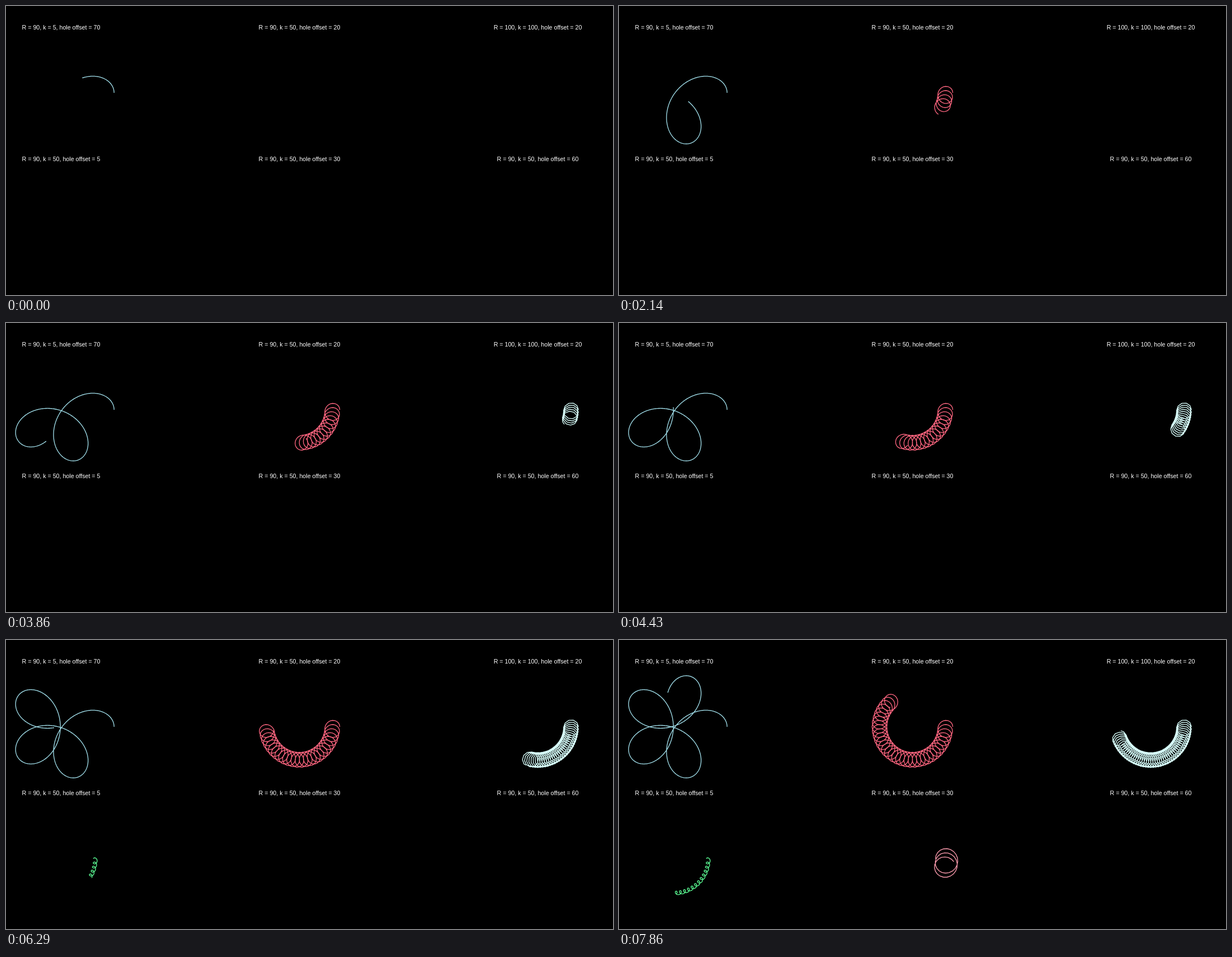
Animation of 1085x516 px, one loop 8 s. Source, as an HTML page:

```html
<!DOCTYPE html>
<html lang="en">
<head>
<meta charset="utf-8">
<title>Spirographs</title>
<style>
  html, body { margin: 0; width: 100%; height: 100%; overflow: hidden; background: #000; }
  svg { display: block; width: 100%; height: 100%; }
  path { fill: none; stroke-width: 2; }
  text { fill: #fff; font: 16px "Liberation Sans", Arial, sans-serif; text-anchor: middle; }
</style>
</head>
<body>
<svg viewBox="0 0 1085 516"></svg>
<script>
const LOOP = 8000, FRAME = 1000 / 7;
const DRAW_TIME = 10000, STAGGER = 2000, HEAD_START = 610;
const SCALE = 2 / 3, SEGMENTS = 1000, R = 90;

// side -1: the wheel rolls inside the ring, +1: outside
const curves = [
  { labelR: 90, k: 5, hole: 70, side: -1, color: '#a2e0ec' },
  { labelR: 90, k: 50, hole: 20, side: -1, color: '#ff6680' },
  { labelR: 100, k: 100, hole: 20, side: -1, color: '#d8fffc' },
  { labelR: 90, k: 50, hole: 5, side: 1, color: '#5cff95' },
  { labelR: 90, k: 50, hole: 30, side: 1, color: '#ff9db0' },
  { labelR: 90, k: 50, hole: 60, side: 1, color: '#ffffff' },
];

const svg = document.querySelector('svg');

function add(parent, tag, attributes) {
  const node = document.createElementNS(svg.namespaceURI, tag);
  for (const name in attributes) node.setAttribute(name, attributes[name]);
  return parent.appendChild(node);
}

function trochoid({ k, hole, side }) {
  const arm = R + side * R / k, ratio = k + side;
  const points = [];
  for (let i = 0; i <= SEGMENTS; i++) {
    const a = i / SEGMENTS * 2 * Math.PI;
    const x = arm * Math.cos(a) - side * hole * Math.cos(ratio * a);
    const y = arm * Math.sin(a) - hole * Math.sin(ratio * a);
    points.push(x.toFixed(3) + ',' + y.toFixed(3));
  }
  return 'M' + points.join('L');
}

curves.forEach((curve, i) => {
  const x = 98.5 + 426 * (i % 3), y = i < 3 ? 155 : 390.6;
  const cell = add(svg, 'g', { transform: `translate(${x} ${y}) scale(${SCALE})` });
  add(cell, 'text', { y: -170 }).textContent =
    `R = ${curve.labelR}, k = ${curve.k}, hole offset = ${curve.hole}`;
  curve.path = add(cell, 'path', { d: trochoid(curve), stroke: curve.color });
  curve.length = curve.path.getTotalLength();
});

function draw(now) {
  // seven pictures a second, each starting on a multiple of 10 ms
  const time = Math.floor((now % LOOP + 5) / FRAME) % 56 * FRAME;
  curves.forEach(({ path, length }, i) => {
    const progress = (time + HEAD_START - i * STAGGER) / DRAW_TIME;
    path.style.display = progress > 0 ? '' : 'none';
    path.setAttribute('stroke-dasharray', `${Math.max(0, progress) * length} ${length * 2}`);
  });
}

const start = performance.now();
function tick() {
  draw(performance.now() - start);
  requestAnimationFrame(tick);
}
tick();
</script>
</body>
</html>
```
